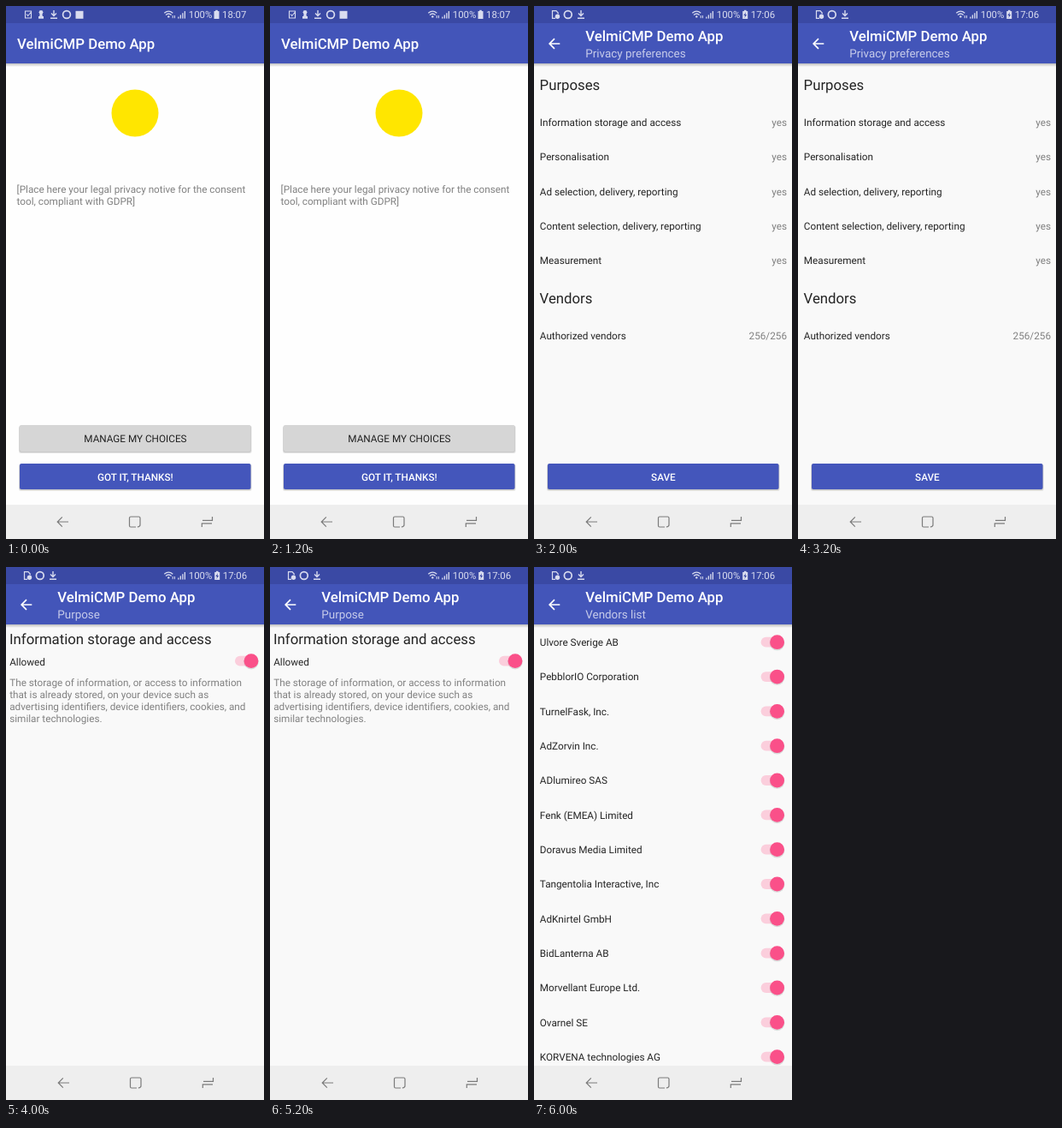
Recreate the animation shown at these times as an HTML page. Size 302 by 622 pixels, loop 8 s.

```html
<!DOCTYPE html>
<html lang="en">
<head>
<meta charset="utf-8">
<title>Consent screens</title>
<style>
  html, body { margin: 0; width: 100%; height: 100%; overflow: hidden; background: #f9f9f9; }
  svg { display: block; width: 302px; height: 622px; }
  text { font-family: Roboto, "Noto Sans", sans-serif; white-space: pre; text-rendering: geometricPrecision; }
  .line { fill: none; stroke-linecap: butt; stroke-linejoin: miter; }
</style>
</head>
<body>
<svg id="stage" viewBox="0 0 302 622" xmlns="http://www.w3.org/2000/svg">
  <defs>
    <linearGradient id="shade" x2="0" y2="1">
      <stop offset="0" stop-color="#000" stop-opacity=".24"/>
      <stop offset="1" stop-color="#000" stop-opacity="0"/>
    </linearGradient>
  </defs>
</svg>
<script>
const HOLD = 2000, ROW = 40.33;
const BODY = 11.74, SUB = 13.42, HEAD = 16.78;
const INK = '#242424', GREY = '#808080', PALE = '#d9dcef', PAPER = '#f9f9f9';
const APP = 'VelmiCMP Demo App';

const text = (x, y, str, size = BODY, fill = INK, more = '') =>
  `<text x="${x}" y="${y}" font-size="${size}" fill="${fill}" ${more}>${str}</text>`;
const rect = (x, y, w, h, fill, more = '') =>
  `<rect x="${x}" y="${y}" width="${w}" height="${h}" fill="${fill}" ${more}/>`;
const disc = (x, y, r, fill, more = '') =>
  `<circle cx="${x}" cy="${y}" r="${r}" fill="${fill}" ${more}/>`;
const line = (d, stroke, width) =>
  `<path class="line" d="${d}" stroke="${stroke}" stroke-width="${width}"/>`;

const right = (y, str) => text(296, y, str, BODY, GREY, 'text-anchor="end"');

function button(y, h, label, fill, ink, weight) {
  return rect(15, y + .6, 272.6, h + 1.4, '#000', 'rx="2.5" opacity=".1"') +
    rect(15.6, y + .8, 271.2, h, '#000', 'rx="2" opacity=".16"') +
    rect(16, y, 270.5, h, fill, 'rx="2"') +
    text(151.4, y + 19.7, label, BODY, ink, `text-anchor="middle" font-weight="${weight}"`);
}

function toggle(x, y) {
  return rect(x - 19, y - 5.9, 27, 11.8, '#fbcedc', 'rx="5.9"') +
    disc(x, y + 1, 8.8, '#000', 'opacity=".12"') +
    disc(x, y, 8.4, '#fa5089');
}

const download = x =>
  line(`M${x} 5V11.4M${x - 3} 8.4L${x} 11.4L${x + 3} 8.4M${x - 4} 14.2H${x + 4}`, PALE, 1.4);
const ring = x => disc(x, 10, 4.4, 'none', `stroke="${PALE}" stroke-width="1.7"`);

function statusLeft(first) {
  if (first) {
    return line('M22.5 6H29.5V14H22.5ZM24 9.5L25.7 11.5L29 7.5', PALE, 1.1) +
      disc(41, 7.3, 2.4, PALE) +
      `<path d="M39.8 8H42.2L42.8 12H44V14.8H38V12H39.2Z" fill="${PALE}"/>` +
      download(56) + ring(71) + rect(81.5, 5.8, 9, 9, PALE);
  }
  return line('M25 14.3H21.5V5.7H26L28.2 8V9.3', PALE, 1.2) +
    disc(27.5, 12.3, 2.7, PALE) + ring(39.8) + download(55);
}

function statusRight(first) {
  const bars = [0, 1, 2, 3].map(i =>
    rect(201.2 + i * 2.5, 12.6 - i * 2.2, 1.3, 2 + i * 2.2, PALE)).join('');
  const x = first ? 243.5 : 244.2;
  return line('M185.3 8.2Q190.3 4 195.3 8.2M187 10.4Q190.3 7.6 193.6 10.4', PALE, 1.3) +
    disc(190.3, 12.4, 1.2, PALE) +
    line('M195.2 11V14.2M197.4 11V14.2', PALE, 1) + bars +
    text(213.8, 14.3, '100%', 11.4, PALE) +
    rect(x, 6, 6, 9, PALE) + rect(x + 1.7, 4.8, 2.6, 1.4, PALE) +
    (first ? '' : `<path d="M247.9 7.2L245.4 11H247L246.4 14L249 10H247.4Z" fill="#3a49a4"/>`) +
    text(first ? 253 : 253.8, 14.3, first ? '18:07' : '17:06', 11.4, PALE);
}

function navBar(dx) {
  const c = '#7b7b7b';
  return rect(0, 582, 302, 40, '#eeeeee') + `<g transform="translate(${dx} 0)">` +
    line('M60.3 602H73M65.8 596.3L60.2 602L65.8 607.7', c, 1.2) +
    line('M152 608H146Q144.5 608 144.5 606.5V597.5Q144.5 596 146 596H155.5Q157 596 157 597.5V605.6Q157 607.6 153.8 608', c, 1.2) +
    line('M230 600.3H241.5V596M241 603.8H229.3V608', c, 1.2) + '</g>';
}

function frame(sub, back, body) {
  const first = !sub;
  const title = first
    ? text(13, 50.3, APP, HEAD, '#fff', 'font-weight="500"')
    : line('M30.3 44H18.5M24 38.2L18.2 44L24 49.8', '#fff', 1.7) +
      text(60.3, 41.3, APP, HEAD, '#fff', 'font-weight="500"') +
      text(60.3, 60.3, sub, SUB, '#c7ccea');
  return rect(0, 0, 302, 622, back) + body +
    rect(0, 67, 302, 4, 'url(#shade)') +
    rect(0, 20, 302, 47, '#4355b9') + rect(0, 0, 302, 20, '#3a49a4') +
    title + statusLeft(first) + statusRight(first) + navBar(first ? 0 : 1);
}

const welcome = disc(151, 125, 27.5, '#ffe600') +
  text(12.6, 218.4, '[Place here your legal privacy notive for the consent', BODY, GREY) +
  text(12.6, 232.4, 'tool, compliant with GDPR]', BODY, GREY) +
  button(489, 31, 'MANAGE MY CHOICES', '#d6d6d6', '#202020', 400) +
  button(534, 30, 'GOT IT, THANKS!', '#4456bb', '#fff', 500);

const purposes = ['Information storage and access', 'Personalisation',
  'Ad selection, delivery, reporting', 'Content selection, delivery, reporting', 'Measurement'];
const choices = text(6.6, 98, 'Purposes', HEAD) +
  purposes.map((p, i) => text(6.8, 140 + i * ROW, p) + right(140 + i * ROW, 'yes')).join('') +
  text(6.6, 347.3, 'Vendors', HEAD) +
  text(6.8, 389.2, 'Authorized vendors') + right(389.2, '256/256') +
  button(534, 30, 'SAVE', '#4456bb', '#fff', 500);

const about = ['The storage of information, or access to information',
  'that is already stored, on your device such as',
  'advertising identifiers, device identifiers, cookies, and', 'similar technologies.'];
const purpose = text(4, 89.5, purposes[0], HEAD) + text(4.2, 115, 'Allowed') +
  toggle(287, 109.6) +
  about.map((s, i) => text(4.2, 139.2 + i * 13.9, s, BODY, GREY)).join('');

const vendors = ['Ulvore Sverige AB', 'PebblorIO Corporation', 'TurnelFask, Inc.',
  'AdZorvin Inc.', 'ADlumireo SAS', 'Fenk (EMEA) Limited', 'Doravus Media Limited',
  'Tangentolia Interactive, Inc', 'AdKnirtel GmbH', 'BidLanterna AB',
  'Morvellant Europe Ltd.', 'Ovarnel SE', 'KORVENA technologies AG'];
const list = vendors.map((v, i) =>
  text(6.8, 92 + i * ROW, v) + toggle(284.6, 87.7 + i * ROW)).join('');

const screens = [
  frame('', '#fefefe', welcome),
  frame('Privacy preferences', PAPER, choices),
  frame('Purpose', PAPER, purpose),
  frame('Vendors list', PAPER, list)
];

const stage = document.getElementById('stage');
stage.insertAdjacentHTML('beforeend', screens.map(s => `<g class="screen">${s}</g>`).join(''));

// Each screen is shown for one hold, then cut.
const count = screens.length;
document.querySelectorAll('.screen').forEach((el, i) => {
  const steps = Array.from({ length: count + 1 }, (_, k) => ({
    offset: k / count, opacity: k % count === i ? 1 : 0, easing: 'step-end'
  }));
  el.animate(steps, { duration: HOLD * count, iterations: Infinity });
});
</script>
</body>
</html>
```
